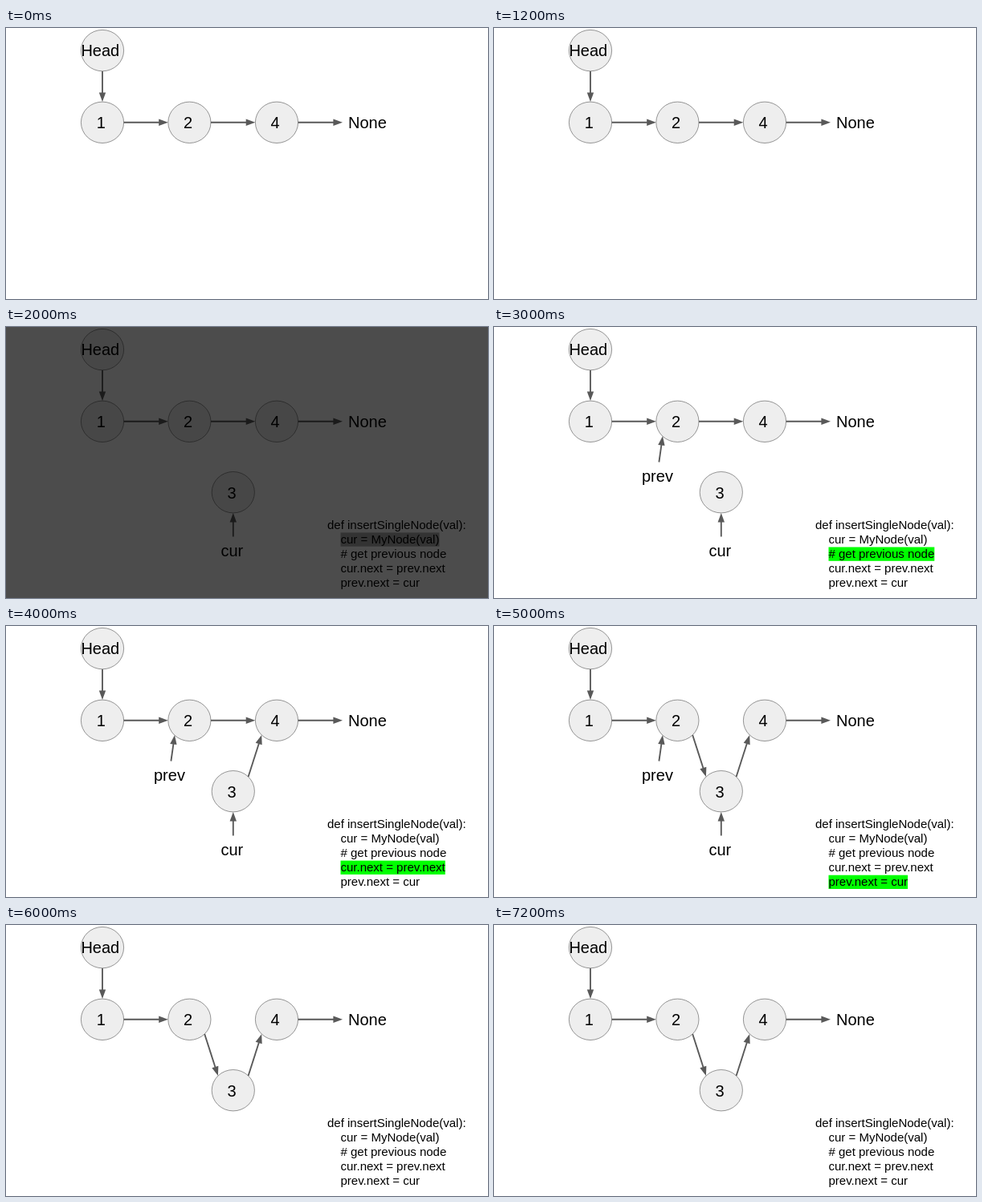
Recreate the animation shown at these times as an HTML page. Size 600x338 px, loop 8 s.

```html
<!DOCTYPE html>
<html lang="en">
<head>
<meta charset="utf-8">
<title>Linked list insertion</title>
<style>
  html, body { margin: 0; height: 100%; overflow: hidden; background: #fff; }
  svg { display: block; width: 100%; height: 100%; font: 20px "Liberation Sans", Arial, sans-serif; }
  .bg { fill: #fff; }
  .node { fill: #eee; stroke: #595959; stroke-width: .625; }
  .line { stroke: #595959; stroke-width: 1.875; }
  .head { fill: #595959; }
  .code { font-size: 15px; }
  .dark { filter: brightness(.3); }
</style>
</head>
<body>
<svg id="stage" viewBox="0 0 600 338"></svg>
<script>
const LOOP = 8000;
const STEP_STARTS = [0, 2000, 3000, 4000, 5000, 6000];
const CODE = [
  [400, "def insertSingleNode(val):"],
  [416.5, "cur = MyNode(val)"],
  [416.5, "# get previous node"],
  [416.5, "cur.next = prev.next"],
  [416.5, "prev.next = cur"],
];
const stage = document.getElementById("stage");
const timed = [];

// Each element is visible from step `first` through step `last`.
function add(tag, attrs, first = 0, last = 5, content = "") {
  const el = document.createElementNS("http://www.w3.org/2000/svg", tag);
  for (const key in attrs) el.setAttribute(key, attrs[key]);
  el.textContent = content;
  stage.append(el);
  timed.push({ el, first, last });
  return el;
}

function text(x, y, content, first, last) {
  return add("text", { x, y }, first, last, content);
}

function node(cx, cy, label, textX, first) {
  add("ellipse", { class: "node", cx, cy, rx: 26.6, ry: 25.7 }, first);
  text(textX, cy + 7.3, label, first);
}

function arrow(x1, y1, x2, y2, first, last) {
  const length = Math.hypot(x2 - x1, y2 - y1);
  const angle = Math.atan2(y2 - y1, x2 - x1) * 180 / Math.PI;
  const transform = `translate(${x2} ${y2}) rotate(${angle})`;
  add("path", { class: "line", d: `M${-length} 0H-11`, transform }, first, last);
  add("path", { class: "head", d: "M0 0L-11.6 4.2V-4.2Z", transform }, first, last);
}

add("rect", { class: "bg", width: 600, height: 338 });

node(120, 28.1, "Head", 93.4);
node(120, 117.8, "1", 112.8);
node(228.4, 117.8, "2", 221);
node(337, 117.8, "4", 329.5);
node(282.8, 206.2, "3", 275.4, 1);
text(426, 125.3, "None");
text(184, 193.4, "prev", 2, 4);
text(267.4, 286, "cur", 1, 4);

arrow(120, 54, 120, 92);
arrow(146.6, 117.8, 201.8, 117.8);
arrow(255, 117.8, 310.3, 117.8, 0, 3);
arrow(363.6, 117.8, 419, 117.8);
arrow(282.8, 261.5, 282.8, 232, 1, 4);
arrow(205.4, 168.5, 210, 136, 2, 4);
arrow(301.6, 188, 318.2, 136, 3);
arrow(247.2, 136, 263.9, 188, 4);

CODE.forEach(([x, content], i) => {
  const y = 252 + i * 18.1;
  const mark = i && add("rect", { x, y: y - 13.7, height: 17.3, fill: i === 1 ? "#aaa" : "#0f0" }, i, i);
  const line = text(x, y, content, 1);
  line.setAttribute("class", "code");
  if (mark) mark.setAttribute("width", line.getComputedTextLength());
});

function draw() {
  const time = performance.now() % LOOP;
  const step = STEP_STARTS.findLastIndex(start => time >= start);
  stage.classList.toggle("dark", step === 1);
  for (const { el, first, last } of timed) {
    el.style.display = step >= first && step <= last ? "" : "none";
  }
  requestAnimationFrame(draw);
}
draw();
</script>
</body>
</html>
```
